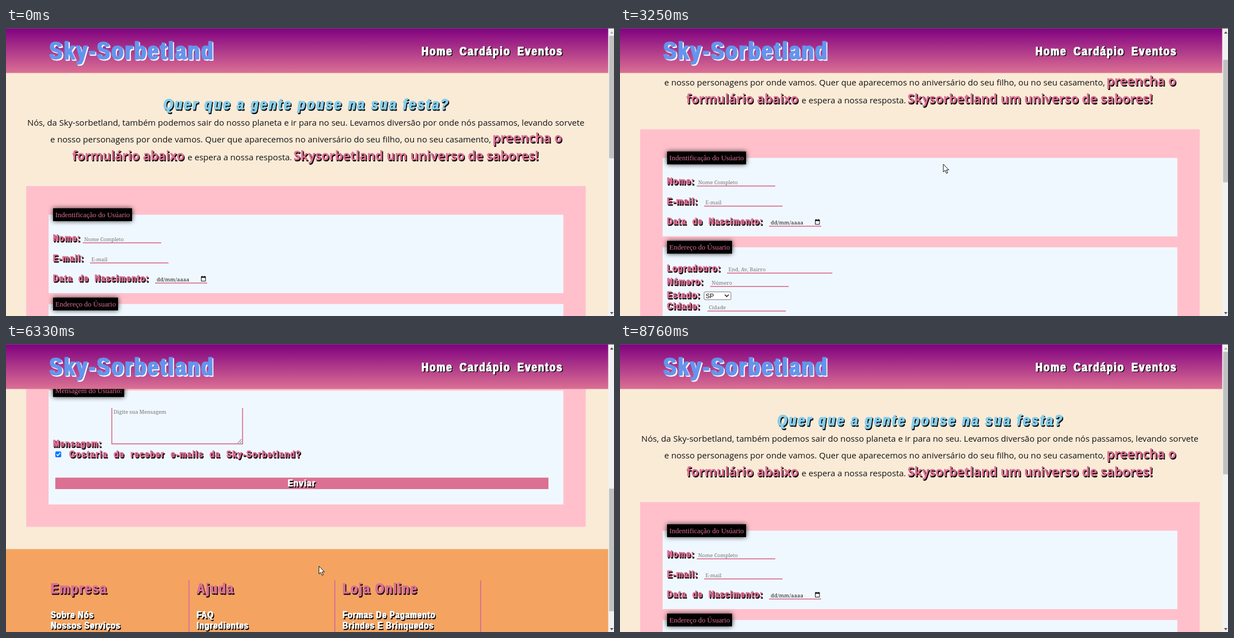
An HTML page for the animation above (9750 ms loop, 1085 by 516 pixels).

```html
<!DOCTYPE html>
<html lang="pt-BR">
<head>
<meta charset="utf-8">
<title>Formulário de festa</title>
<style>
html, body { margin: 0; width: 100%; height: 100%; overflow: hidden; background: #faebd7; }
svg { display: block; }
text { white-space: pre; }
.display { font-family: "Liberation Sans", Arial, sans-serif; font-weight: bold; }
.body { font-family: "Open Sans", "Noto Sans", sans-serif; }
.legend { font-family: "Liberation Serif", "Times New Roman", serif; }
.hint { font-family: "Noto Serif", "Liberation Serif", serif; }
.ui { font-family: "Liberation Sans", Arial, sans-serif; }
.glow { filter: drop-shadow(0 0 4px #000c); }
</style>
</head>
<body>
<svg id="stage" width="1085" height="516" viewBox="0 0 1085 516"></svg>
<script>
const LOOP = 9750, NARROW = .78, BAR = .423;
const ROSE = '#db7093', ICE = '#f0f8ff';

const rect = (x, y, w, h, fill, more = '') =>
  `<rect x="${x}" y="${y}" width="${w}" height="${h}" fill="${fill}" ${more}/>`;

const path = (d, stroke, width = 1, fill = 'none') =>
  `<path d="${d}" fill="${fill}" stroke="${stroke}" stroke-width="${width}"/>`;

const plain = (x, y, str, size, fill, cls, more = '') =>
  `<text class="${cls}" x="${x}" y="${y}" font-size="${size}" fill="${fill}" ${more}>${str}</text>`;

// Condensed lettering, thickened sideways by a second strike, with a hard shadow
function display(x, y, str, size, fill, { gap = 1.6, word = 0, shadow = '#000', off = 1.5, style = 'normal' } = {}) {
  const strike = (dx, dy, color) =>
    `<text class="display" transform="translate(${x + dx} ${y + dy}) scale(${NARROW} 1)" fill="${color}" stroke="${color}"
      style="font-size:${size}px;stroke-width:${size * .02};letter-spacing:${gap / NARROW}px;
      word-spacing:${word / NARROW}px;font-style:${style}">${str}</text>`;
  const layer = (d, color) => [-1, 1].map(side => strike(d + side * size * .025, d, color)).join('');
  return layer(off, shadow) + layer(0, fill);
}

const label = (y, str, x = 84, gap = 1.6) => display(x, y, str, 17, ROSE, { gap, word: 5 });
const body = (x, y, str) => plain(x, y, str, 15.12, '#111', 'body');
const hint = (x, y, str) => plain(x, y, str, 9.3, '#757575', 'hint');

const strong = (x, y, str) => [[1.5, '#000'], [0, ROSE]].map(([d, color]) =>
  plain(x + d, y + d, str, 22.35, color, 'body', 'font-weight="700"')).join('');

const fieldset = (y, h, legend, w) =>
  rect(76, y, 918.6, h, ICE) + rect(84, y - 11.5, w, 23, '#000', 'class="glow"') +
  plain(88, y + 4.5, legend, 12.8, ROSE, 'legend');

const field = (y, name, x, w, str) =>
  label(y, name) + rect(x, y + 2, w, 1.7, ROSE) + hint(x + 2.5, y, str);

const intro =
  display(281, 146, 'Quer que a gente pouse na sua festa?', 28, '#87ceeb', { gap: 3.25, style: 'italic' }) +
  body(38, 175, 'Nós, da Sky-sorbetland, também podemos sair do nosso planeta e ir para no seu. Levamos diversão por onde nós passamos, levando sorvete') +
  body(79, 205, 'e nosso personagens por onde vamos. Quer que aparecemos no aniversário do seu filho, ou no seu casamento,') +
  strong(868, 205, 'preencha o') +
  strong(118, 237, 'formulário abaixo') +
  body(324, 237, 'e espera a nossa resposta.') +
  strong(513, 237, 'Skysorbetland um universo de sabores!');

const person =
  fieldset(334.5, 140.5, 'Indentificação do Usúario', 141) +
  field(382, 'Nome:', 137, 140, 'Nome Completo') +
  field(418, 'E-mail:', 150, 140, 'E-mail') +
  field(454, 'Data de Nascimento:', 266, 93, '') +
  plain(269, 454, 'dd/mm/aaaa', 9.3, '#111', 'hint', 'letter-spacing=".3"') +
  path('M348.5 446.5h7.5v7h-7.5z M350 444v2 M354.5 444v2', '#111') + rect(348, 445, 8.5, 2.5, '#111');

const address =
  fieldset(494.5, 140.5, 'Endereço do Úsuario', 116) +
  field(538, 'Logradouro:', 191, 188, 'End, Av, Bairro') +
  field(562, 'Número:', 161, 140, 'Número') +
  label(586, 'Estado:') + rect(150, 574.5, 48, 14, '#fff', 'rx="2" stroke="#767676"') +
  plain(153, 585.5, 'SP', 11, '#000', 'ui') + path('M187 579.5l3.5 3.5 3.5-3.5', '#111', 1.5) +
  field(606, 'Cidade:', 156, 140, 'Cidade');

const message =
  fieldset(663, 204, 'Mensagem do Úsuario:', 127) +
  path('M188.8 694V758.5H422.2V694', ROSE, 1.7) + hint(192, 705, 'Digite sua Mensagem') +
  path('M413.5 757l7-7 M417.5 757l3-3', '#555') +
  label(764, 'Mensagem:') +
  rect(88, 772, 10.5, 10.5, '#0075ff', 'rx="2"') + path('M90 777l2.5 2.6 4.2-5', '#fff', 1.6) +
  label(783, 'Gostaria de receber e-mails da Sky-Sorbetland?', 113, 1.9) +
  rect(88, 819, 880, 20.5, ROSE, 'id="send"') + display(503, 835, 'Enviar', 17, '#fff');

const footer = rect(0, 947, 1075, 220, '#f4a460') + [
  ['Empresa', 'Sobre Nós', 'Nossos Serviços', 'Contato'],
  ['Ajuda', 'FAQ', 'Ingredientes', 'Entregas'],
  ['Loja Online', 'Formas De Pagamento', 'Brindes E Brinquedos', 'Promoções']
].map(([title, ...links], col) => {
  const x = 80 + 260.3 * col;
  return rect(x + 245.5, 1003, 2, 108, ROSE) +
    display(x, 1027, title, 26, ROSE, { gap: 2.2 }) +
    links.map((s, row) => display(x, 1071 + row * 18.6, s, 17, '#fff', { gap: 1.2 })).join('');
}).join('');

const header =
  rect(0, 0, 1075, 80.6, 'url(#sky)') +
  display(77.5, 56, 'Sky-Sorbetland', 44, '#6495ed', { gap: 3.1, shadow: '#fff', off: 1.8 }) +
  display(741.5, 48.5, 'Home Cardápio Eventos', 22, '#fff', { gap: 2.1, word: 5.2 });

const scrollbar =
  rect(1074.6, 0, 10.4, 516, '#f1f1f1') +
  rect(1076.3, 14, 8.7, 219.5, '#c1c1c1', 'id="thumb"') +
  '<path id="up" d="M1078 10h6l-3-4z"/><path d="M1078 509h6l-3 4z" fill="#505050"/>';

const $ = id => document.getElementById(id);
$('stage').innerHTML = `
  <defs><linearGradient id="sky" x2="0" y2="1">
    <stop stop-color="#800080"/><stop offset="1" stop-color="${ROSE}"/>
  </linearGradient></defs>
  ${rect(0, 0, 1085, 516, '#faebd7')}
  <g id="page">${intro}${rect(36, 283.2, 998.6, 624, '#ffc0cb')}${person}${address}${message}${footer}</g>
  ${header}${scrollbar}${rect(0, 0, 1085, 1, '#585862')}
  <path id="cursor" d="M0 0V14L3.2 11 5.5 16.4 7.8 15.4 5.5 10.2H9.8Z" fill="#fff" stroke="#111"/>`;

// Each gesture: start, end, where it arrives
const scrolls = [
  [1560, 1830, 36], [2710, 3250, 101], [3250, 3600, 222], [3800, 4010, 330], [4210, 4550, 420],
  [4750, 5710, 517], [6270, 6480, 643], [7690, 8690, 0]
];
const moves = [
  [100, 160, 849, 408], [430, 620, 700, 382], [1020, 1220, 584, 341], [1560, 1830, 577, 244],
  [3800, 4010, 577, 230], [4750, 6130, 558.5, 398], [6730, 7060, 549.5, 385], [8100, 8690, 626, 398]
];

const easeOut = p => 1 - (1 - p) ** 2;

const follow = (from, gestures, t) => gestures.reduce((pos, [start, end, ...to]) => {
  const p = easeOut(Math.min(1, Math.max(0, (t - start) / (end - start))));
  return pos.map((v, i) => v + (to[i] - v) * p);
}, from);

function draw(t) {
  const [scroll] = follow([0], scrolls, t), [x, y] = follow([937, 454], moves, t);
  const overSend = y + scroll > 819 && y + scroll < 839.5;
  $('page').setAttribute('transform', `translate(0 ${-scroll})`);
  $('thumb').setAttribute('y', 14 + scroll * BAR);
  $('up').setAttribute('fill', scroll > 0 ? '#505050' : '#b0b0b0');
  $('send').setAttribute('fill', overSend ? '#c75b80' : ROSE);
  $('cursor').setAttribute('transform', `translate(${x} ${y})`);
  $('cursor').setAttribute('visibility', t >= 100 && t < 8760 ? 'visible' : 'hidden');
}

const start = performance.now();
function tick() {
  draw((performance.now() - start) % LOOP);
  requestAnimationFrame(tick);
}
tick();
</script>
</body>
</html>
```
